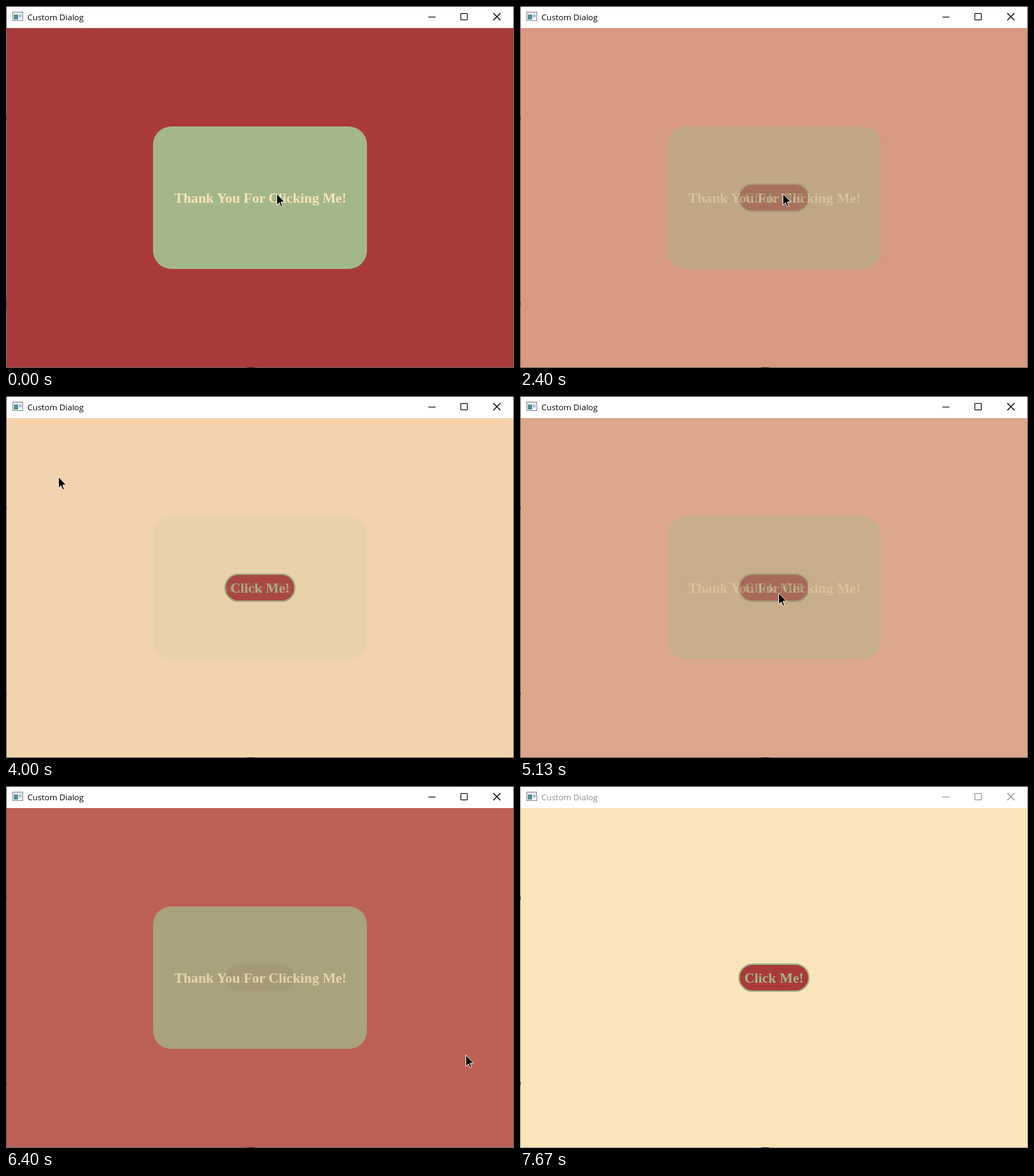
Recreate the animation shown at these times as an HTML page. Size 712x508 px, loop 7.79 s.

```html
<!DOCTYPE html>
<html lang="en">
<head>
<meta charset="utf-8">
<title>Custom Dialog</title>
<style>
  html, body { margin: 0; width: 100%; height: 100%; overflow: hidden; }
  svg { display: block; width: 712px; height: 508px; }
  .label { font: bold 19.6px "Liberation Serif", serif; text-anchor: middle; }
  .title { font: 11.6px "Open Sans", sans-serif; }
  #bar { color: #000; }
  #edge { color: #646464; }
  .blur #bar { color: #8e8e8e; }
  .blur #edge { color: #a4a09a; }
</style>
</head>
<body>
<svg id="stage" viewBox="0 0 712 508">
  <rect width="712" height="508" fill="#fae5b8"/>
  <rect x="307" y="250" width="98" height="38" rx="19" fill="#aa3a3a" stroke="#a3b78a" stroke-width="2"/>
  <text class="label" x="356" y="275.5" fill="#a3b78a">Click Me!</text>

  <rect class="fade" y="31" width="712" height="477" fill="#aa3a3a"/>
  <rect class="fade" x="206" y="169" width="300" height="200" rx="26" fill="#a3b78a"/>
  <text class="label fade" x="356.5" y="275.5" fill="#fae5b8">Thank You For Clicking Me!</text>

  <g id="bar">
    <rect width="712" height="31" fill="#fff"/>
    <g shape-rendering="crispEdges">
      <rect x="9" y="8" width="15" height="13" fill="#8b9096"/>
      <rect x="10" y="9" width="13" height="2" fill="#dfe4e8"/>
      <rect x="10" y="11" width="13" height="9" fill="#f4f5f6"/>
      <rect x="11" y="12" width="6" height="7" fill="#4f8f98"/>
      <rect x="18" y="12" width="4" height="4" fill="#b4bfca"/>
    </g>
    <text class="title" x="30" y="20" fill="currentColor">Custom Dialog</text>
    <g fill="none" stroke="currentColor">
      <path d="M592 15.5h10M637.5 10.5h9v9h-9z"/>
      <path d="M683 10l10 10M693 10l-10 10" stroke-width="1.3"/>
    </g>
  </g>

  <g id="edge" fill="none" shape-rendering="crispEdges">
    <path d="M.5 0V508M711.5 0V508M0 507.5H712" stroke="currentColor"/>
    <path d="M0 .5H712" stroke="#2b2b2b"/>
    <path d="M.5 155v5M.5 415v5" stroke="#23405c"/>
    <path d="M338 507.5h11" stroke="#222"/>
  </g>

  <path id="cursor" d="M.5 .5V16.5L4 13 6.5 18.5 8.7 17.7 6.5 12H11.5Z" stroke="#fff" stroke-width=".9"/>
</svg>
<script>
const LOOP = 7790, STEP = 1000 / 15, LAST = 115, FADE = 350;
const stage = document.getElementById("stage");
const cursor = document.getElementById("cursor");
const layers = document.querySelectorAll(".fade");

// The pointer travels to each stop, then clicks, which toggles the overlay.
const home = { x: 379, y: 263 };
const stops = [
  { from: 0, to: 600, x: 354, y: 288, click: 1126, loop: 68 },
  { from: 1800, to: 1933, x: 368, y: 263, click: 2338 },
  { from: 2600, to: 3200, x: 73, y: 113, click: 3815 },
  { from: 4400, to: 4800, x: 362, y: 276, click: 5084 },
  { from: 5350, to: 5866, x: 644, y: 377, click: 6371 },
  { from: 6650, to: 7400, x: 102, y: 510 }
];

const clamp = x => Math.max(0, Math.min(1, x));
const smooth = x => x * x * (3 - 2 * x);

function overlay(t) {
  const done = stops.filter(s => s.click <= t);
  if (!done.length) return 1;
  const rest = (1 - clamp((t - done.at(-1).click) / FADE)) ** 3;
  return done.length % 2 ? rest : 1 - rest;
}

function pointer(t) {
  let { x, y } = home;
  for (const s of stops) {
    const k = smooth(clamp((t - s.from) / (s.to - s.from)));
    const a = 2 * Math.PI * k, r = s.loop ?? 0;
    x += (s.x - x) * k - r * (1 - Math.cos(a));
    y += (s.y - y) * k + r * Math.sin(a);
  }
  return [Math.round(x), Math.round(y)];
}

// The picture advances at 15 steps a second; the window loses focus on the last one.
function draw(now) {
  const tick = Math.min(LAST, Math.floor((now % LOOP + 3.4) / STEP));
  const t = tick * STEP;
  const p = overlay(t);
  layers.forEach(el => el.setAttribute("opacity", p));
  cursor.setAttribute("transform", `translate(${pointer(t)})`);
  stage.classList.toggle("blur", tick === LAST);
}

let start;
function frame(now) {
  start ??= now;
  draw(now - start);
  requestAnimationFrame(frame);
}
draw(0);
requestAnimationFrame(frame);
</script>
</body>
</html>
```
